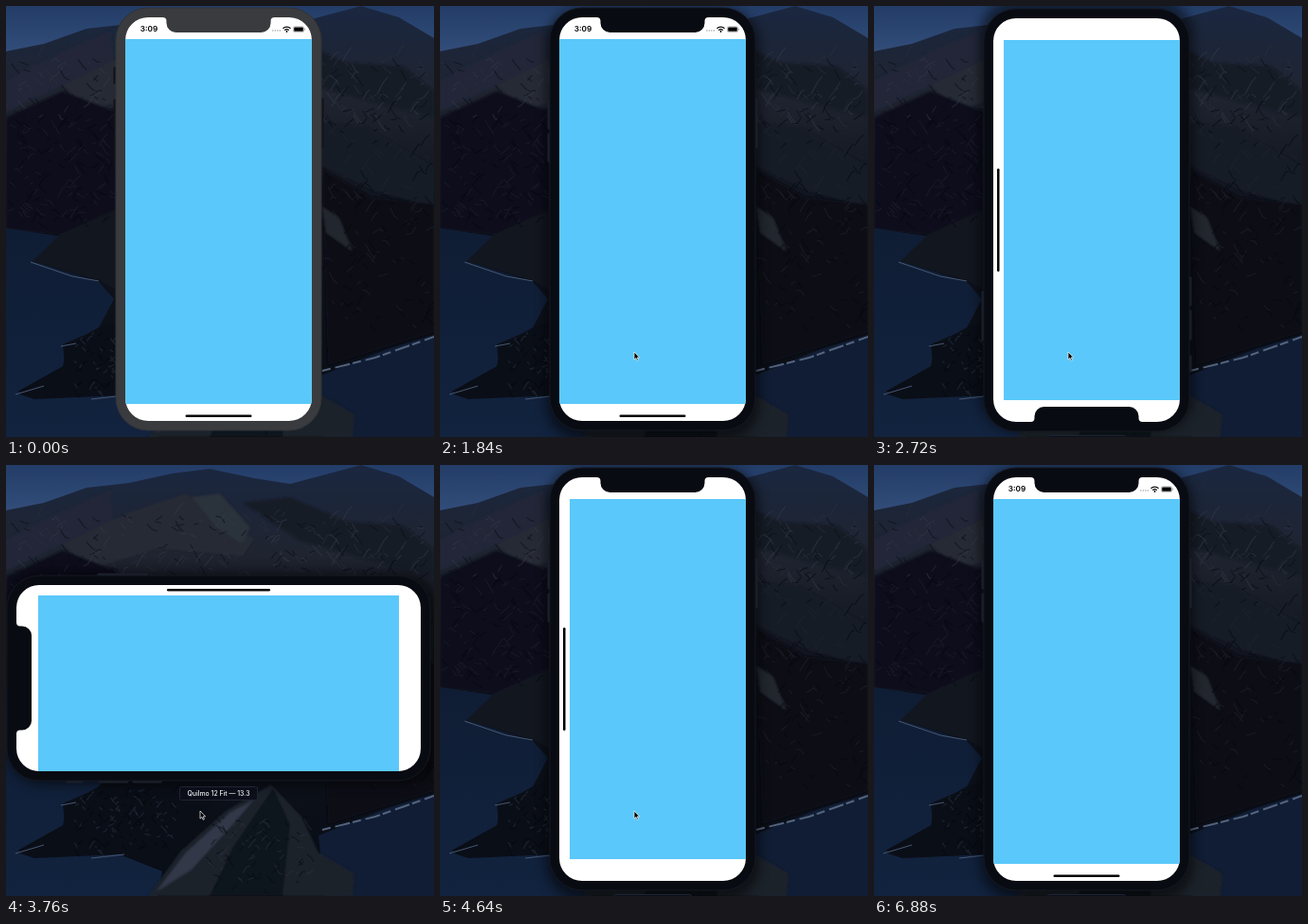
Recreate the animation shown at these times as an HTML page. Size 452 px wide and 456 px high, loop 6960 ms.

```html
<!DOCTYPE html>
<html lang="en">
<head>
<meta charset="utf-8">
<title>Rotating phone</title>
<style>
html, body { margin: 0; width: 100%; height: 100%; overflow: hidden; background: #0c111d; }
svg { display: block; width: 452px; height: 456px; }
text { font-family: Inter, "Liberation Sans", sans-serif; }
</style>
</head>
<body>
<svg viewBox="0 0 452 456">
  <defs>
    <linearGradient id="sky" x2="0" y2="1">
      <stop offset="0" stop-color="#233d68"/><stop offset="1" stop-color="#3a5482"/>
    </linearGradient>
    <linearGradient id="hill" x2="0" y2="1">
      <stop offset="0" stop-color="#1a2740"/><stop offset=".2" stop-color="#1f2430"/><stop offset=".45" stop-color="#10141e"/><stop offset="1" stop-color="#080c14"/>
    </linearGradient>
    <linearGradient id="sea" x2="0" y2="1">
      <stop offset="0" stop-color="#0f1d34"/><stop offset="1" stop-color="#12233f"/>
    </linearGradient>
    <filter id="soft" x="-20%" y="-20%" width="140%" height="140%"><feGaussianBlur stdDeviation="1.2"/></filter>
    <filter id="blur" x="-20%" y="-20%" width="140%" height="140%"><feGaussianBlur stdDeviation="6"/></filter>
    <clipPath id="glass">
      <path d="M-98.5-189.5a24 24 0 0 1 24-24H-59a4 4 0 0 1 4 4v2a10 10 0 0 0 10 10H45a10 10 0 0 0 10-10v-2a4 4 0 0 1 4-4H74.5a24 24 0 0 1 24 24V189.5a24 24 0 0 1-24 24H-74.5a24 24 0 0 1-24-24Z"/>
    </clipPath>
  </defs>

  <!-- coast -->
  <rect width="452" height="70" fill="url(#sky)"/>
  <path d="M0 48L40 40 85 24 130 19 175 9 215 4 262 14 300 20 345 8 375 0 415 12 452 34V456H0Z" fill="url(#hill)"/>
  <g filter="url(#soft)">
    <path d="M0 78L55 50 110 26 116 90 60 84 0 112Z" fill="#222838"/>
    <path d="M60 84L130 50 190 30 230 62 262 78 250 96 160 88 90 110Z" fill="#262a35"/>
    <path d="M196 34L226 30 258 66 250 84 222 66Z" fill="#2c303a"/>
    <path d="M250 40L300 34 360 60 420 64 452 90V118L380 100 310 80Z" fill="#181c27"/>
    <path d="M0 118L60 90 116 112V215L60 242 0 236Z" fill="#0c111b"/>
    <path d="M334 124L380 128 452 170V212L390 196 334 168Z" fill="#181b25"/>
    <path d="M334 172L385 202 452 210V345L340 380Z" fill="#090d15"/>
    <path d="M334 212L352 224 366 260 338 240Z" fill="#22262f"/>
  </g>
  <path d="M0 235L60 244 28 270 98 292 114 310 97 342 60 358 62 380 12 408 120 412 165 430 160 456H0Z" fill="url(#sea)"/>
  <path d="M28 270L58 241 116 216V300L98 290Z" fill="#12161f"/>
  <path d="M330 392L400 364 452 348V456H336Z" fill="#101d34"/>
  <path d="M12 410L60 382 64 360 98 340 130 330 230 336 175 430 120 412 30 416Z" fill="#0a0e17"/>
  <g filter="url(#soft)">
    <path d="M150 456L185 408 232 366 280 338 312 372 330 410 368 432 366 456Z" fill="#1c212c"/>
    <path d="M215 456L240 404 282 342 300 380 292 456Z" fill="#11151f"/>
    <path d="M158 452L190 410 236 368 262 354 238 382 196 428Z" fill="#323947"/>
  </g>
  <path d="M334 386L390 372 452 350" fill="none" stroke="#53637d" stroke-width="2" stroke-dasharray="9 5 16 3"/>
  <path d="M10 411L40 402M58 360L74 357M26 271L70 286 98 291M90 416L125 412" fill="none" stroke="#465873" stroke-width="1"/>
  <g id="grain"></g>

  <g id="device">
    <rect id="shade" x="-113" y="-224" width="226" height="458" rx="38" fill="#000" opacity=".5" filter="url(#blur)"/>
    <g id="keys">
      <rect x="-111" y="-161" width="4" height="18" rx="1"/>
      <rect x="-111" y="-127" width="4" height="32" rx="1"/>
      <rect x="-111" y="-91" width="4" height="31" rx="1"/>
      <rect x="107" y="-128" width="4" height="53" rx="1"/>
    </g>
    <rect id="body" x="-108.5" y="-223.5" width="217" height="447" rx="34"/>
    <g clip-path="url(#glass)">
      <rect x="-100" y="-215" width="200" height="430" fill="#000"/>
      <g id="app">
        <rect id="page" fill="#fff"/>
        <rect id="area" fill="#5ac8fa"/>
        <g id="status">
          <text x="-82.8" y="-198.5" font-size="8.2" font-weight="600">3:09</text>
          <g fill="#9a9a9e">
            <circle cx="57.3" cy="-199.5" r=".7"/><circle cx="59.8" cy="-199.5" r=".7"/>
            <circle cx="62.3" cy="-199.5" r=".7"/><circle cx="64.8" cy="-199.5" r=".7"/>
          </g>
          <g fill="none" stroke="#000" stroke-width="1.2">
            <path d="M68-201.8a5.8 5.8 0 0 1 8 0M69.7-199.9a3.4 3.4 0 0 1 4.6 0"/>
          </g>
          <circle cx="72" cy="-198.5" r=".9"/>
          <rect x="78.9" y="-203.7" width="11.2" height="5.8" rx="1.6" fill="none" stroke="#8a8a90" stroke-width=".6"/>
          <rect x="79.7" y="-202.9" width="9.6" height="4.2" rx=".9"/>
          <rect x="90.8" y="-201.9" width=".8" height="2" rx=".4" fill="#8a8a90"/>
        </g>
        <rect id="bar" height="2.5" rx="1.25"/>
      </g>
    </g>
  </g>

  <g id="tag">
    <rect x="183.5" y=".5" width="82" height="14" rx="2" fill="#0b0f19" fill-opacity=".9" stroke="#1f2533" stroke-width="1"/>
    <text x="224.5" y="10" font-size="6.9" font-weight="500" fill="#f2f3f7" text-anchor="middle">Quilmo 12 Fit — 13.3</text>
  </g>
  <path id="cursor" d="M0 0V8.2L1.9 6.4 3.1 9.3 4.4 8.8 3.2 5.9H5.6Z" fill="#000" stroke="#fff" stroke-width=".7"/>
</svg>

<script>
const LOOP = 6960, STEP = 80;
const ACTIVE = 720;

// Device snaps to `dev`; the app then turns from one angle to another.
// `wide` gives the app layout before and after: 0 portrait, 1 landscape.
const turns = [
  { at: 0, dev: 0, from: 0, to: 0, dur: 1, wide: [0, 0] },
  { at: 1920, dev: 90, from: 90, to: 0, dur: 400, wide: [0, 1] },
  { at: 2640, dev: 180, from: 90, to: 90, dur: 1, wide: [1, 1] },
  { at: 3680, dev: 270, from: -180, to: 0, dur: 527, wide: [1, 1] },
  { at: 4640, dev: 360, from: 90, to: 0, dur: 400, wide: [1, 0] }
];

const el = id => document.getElementById(id);
const set = (id, attrs) => {
  for (const k in attrs) el(id).setAttribute(k, attrs[k]);
};
const show = (id, on) => set(id, { visibility: on ? "visible" : "hidden" });
const lerp = (a, b, p) => a + (b - a) * p;
const ease = p => (1 - Math.cos(Math.PI * p)) / 2;
const part = (t, start, dur) => Math.min(1, Math.max(0, (t - start) / dur));

// Rough rock relief
function addGrain() {
  let seed = 7;
  const rnd = () => (seed = (seed * 16807) % 2147483647) / 2147483647;
  const scatter = (count, x, y, w, h, len, colors) => {
    let out = "";
    for (let i = 0; i < count; i++) {
      const l = len * (0.4 + rnd()), tilt = rnd() < 0.5 ? -1 : 1;
      const color = colors[Math.floor(rnd() * colors.length)];
      out += `<path d="M${x + rnd() * w} ${y + rnd() * h}l${l * 0.5} ${tilt * l * rnd()} ${l * 0.4} ${tilt * l * rnd() * 0.6}" stroke="${color}"/>`;
    }
    return out;
  };
  const rocks =
    scatter(240, 0, 52, 445, 66, 9, ["#333a48", "#2a2f3b", "#0a0e18"]) +
    scatter(130, 0, 118, 110, 112, 8, ["#1d222d", "#05080f"]) +
    scatter(150, 334, 110, 112, 230, 8, ["#20242e", "#05080f"]) +
    scatter(130, 70, 345, 110, 62, 5, ["#2b3341", "#04070d"]) +
    scatter(90, 210, 372, 110, 80, 7, ["#2b313d", "#080b13"]);
  el("grain").innerHTML = `<g fill="none" stroke-width="1.1" opacity=".6">${rocks}</g>`;
}

function drawApp(wide, angle, moving) {
  const w = lerp(197, 427, wide), h = lerp(427, 197, wide);
  const side = 23 * wide, top = 23 * (1 - wide), bottom = lerp(18, 11, wide);
  const barW = lerp(70, 109, wide);
  set("app", { transform: `rotate(${angle})` });
  set("page", { x: -w / 2, y: -h / 2, width: w, height: h });
  set("area", { x: side - w / 2, y: top - h / 2, width: w - 2 * side, height: h - top - bottom });
  set("bar", { x: -barW / 2, y: h / 2 - 6.5, width: barW });
  show("bar", !moving);
  show("status", wide === 0);
}

function drawCursor(t) {
  const come = ease(part(t, 240, 400)), go = ease(part(t, 5780, 300));
  const x = lerp(lerp(300, 205, come), 361.4, go);
  const y = lerp(lerp(456, 366, come), 122.4, go);
  set("cursor", { transform: `translate(${x} ${y})` });
  show("cursor", t > 240 && t < 6240);
}

function render(t) {
  const turn = turns.filter(s => s.at <= t).pop();
  const first = turn === turns[0];
  const upright = turn.dev % 180 === 0;
  const p = part(t, turn.at + STEP, turn.dur);
  const spin = turn.from !== turn.to;
  const angle = lerp(turn.from, turn.to, ease(p));
  const wide = lerp(turn.wide[0], turn.wide[1], ease(p));
  const y = upright && !first ? 226.5 : 225.5;

  set("device", { transform: `translate(224.5 ${y}) rotate(${turn.dev})` });
  drawApp(wide, angle - turn.dev, spin && p > 0 && p < 1);

  const on = t >= ACTIVE;
  set("body", { fill: on ? "#090b12" : "#3a3b3e", stroke: on ? "#151821" : "#303236" });
  set("keys", { fill: on ? "#1b1f2a" : "#10131b" });
  show("shade", on);

  set("tag", { transform: `translate(0 ${upright ? 454 : 340})` });
  show("tag", !first);
  drawCursor(t);
}

addGrain();
const begin = performance.now();
function tick() {
  const t = (performance.now() - begin) % LOOP;
  render(Math.floor(t / STEP) * STEP);
  requestAnimationFrame(tick);
}
tick();
</script>
</body>
</html>
```
